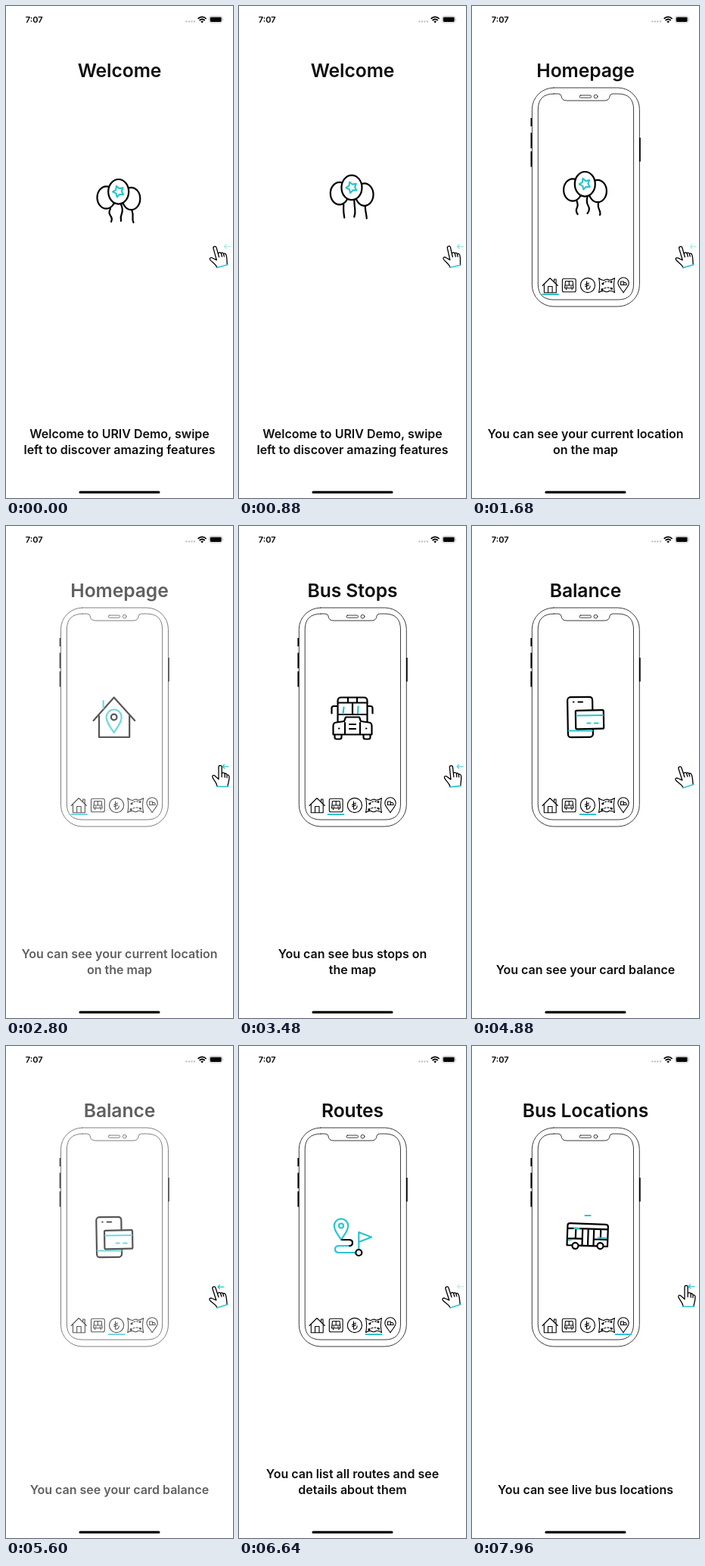
An HTML page that plays this animation: 300x650 px, repeating every 8000 ms.

```html
<!DOCTYPE html>
<html lang="en">
<head>
<meta charset="utf-8">
<title>Onboarding</title>
<style>
  html, body { margin: 0; width: 100%; height: 100%; overflow: hidden; background: #fff; }
  svg { display: block; width: 300px; height: 650px; }
  text { font-family: Inter, "Open Sans", sans-serif; font-weight: 600; fill: #0e0e10; text-anchor: middle; }
  #title { font-size: 24.7px; letter-spacing: -.1px; }
  .caption { font-size: 16px; }
  .clock { font-size: 11px; fill: #000; text-anchor: start; }
  .line { fill: none; stroke: #000; stroke-linecap: round; stroke-linejoin: round; }
  .icon { stroke-width: 2.2; }
  .tab { stroke-width: 1.1; }
  .frame { stroke: #3c3c3c; stroke-width: 1; }
  .cyan { stroke: #2bc4d0; }
  .paper { fill: #fff; }
</style>
</head>
<body>
<svg viewBox="0 0 300 650">
  <g id="status">
    <text class="clock" x="25.7" y="22">7:07</text>
    <g fill="#c4c4c6">
      <circle cx="238.5" cy="20.5" r="1.2"/><circle cx="242" cy="20.5" r="1.2"/>
      <circle cx="245.5" cy="20.5" r="1.2"/><circle cx="249" cy="20.5" r="1.2"/>
    </g>
    <g class="line" stroke-width="1.7" style="stroke-linecap:butt">
      <path d="M253.7 16.8Q259.2 12 264.7 16.8M255.6 19Q259.2 16 262.8 19"/>
    </g>
    <path d="M257.3 20.4Q259.2 18.9 261.1 20.4L259.2 22.4Z"/>
    <rect x="268.7" y="13.6" width="17" height="8.4" rx="2.4" fill="none" stroke="#aaa" stroke-width=".7"/>
    <rect x="269.8" y="14.7" width="14.8" height="6.2" rx="1.4"/>
    <path d="M286.6 16.5q1.5 1.4 0 2.8z" fill="#999"/>
  </g>

  <g id="words">
    <text id="title" x="150" y="94"></text>
    <text class="caption" x="150" y="571"></text>
    <text class="caption" x="150" y="592"></text>
  </g>

  <g id="scene">
    <g id="phone" class="line">
      <g class="frame">
        <rect x="79.3" y="108" width="142" height="289" rx="28.5"/>
        <path d="M108 116H114Q117.5 116 118 119Q118.500 125 125 125H175Q181.500 125 182 119Q182.500 116 186 116H193Q213.500 116 213.500 137V367Q213.500 388 193 388H108Q87.200 388 87.200 367V137Q87.200 116 108 116Z"/>
        <rect x="142" y="118" width="15.500" height="3.200" rx="1.600"/>
        <circle cx="163.500" cy="119.600" r="2.400"/>
      </g>
      <path stroke-width="1.800" style="stroke-linecap:butt" d="M78.300 148V159M78.300 167.500V188M78.300 192V212.500M221.800 174V205.500"/>
      <g class="tab">
        <path d="M93 369.500L103 359.500L113.300 369.500M95.300 367.500V378.700H111.200V367.500M100.500 378.700V370.500H106V378.700M108.500 361V364.500M108.500 361H111V367"/>
        <rect x="119.300" y="360.200" width="17.800" height="17.600" rx="2"/>
        <path d="M123.500 363.500H133L134 372.800H122.500ZM123 369H133.500M128.200 364V369M124.500 373V374.800M132 373V374.800M124.800 371H126M130.500 371H131.700"/>
        <circle cx="152.900" cy="369" r="9.600"/>
        <path d="M151.500 363.800V374.300Q155.800 374.300 156.200 370M149.500 368.300L154.500 366M149.500 370.800L154.500 368.500"/>
        <path d="M167.500 359.500Q171 362.800 174.500 362.500Q178 359.800 181.500 362.300Q185 361.800 188.500 359.500Q186.300 369 188.500 378.500Q185 376 181.500 376.300Q178 379 174.500 376.500Q171 376 167.500 378.500Q169.700 369 167.500 359.500Z"/>
        <path stroke-dasharray="2 2" d="M172.500 367Q177 362 184 365M171.500 375Q178 370 185 373.500"/>
        <path stroke-width="2.400" d="M171.500 374.500h.6M172.500 367h.6M183.700 364.500h.6M184.200 373.500h.6"/>
        <path d="M200 378.700C196.500 373 192.800 370 192.800 366A7.200 7.200 0 0 1 207.200 366C207.200 370 203.500 373 200 378.700ZM196.500 364H200.500V368.500H196.500ZM200.500 365.500H203L204 367V368.500H200.500"/>
        <path id="underline" class="cyan" stroke-width="1.800" d="M0 381H21"/>
      </g>
    </g>

    <g id="icons" class="line icon">
      <g>
        <ellipse cx="132.500" cy="253" rx="12" ry="14.700"/>
        <ellipse cx="165.500" cy="254.500" rx="11.800" ry="14.700"/>
        <ellipse class="paper" cx="148.700" cy="245.300" rx="13.500" ry="16.300"/>
        <path id="star" class="cyan"/>
        <path id="strings"/>
      </g>
      <g>
        <path d="M122.500 257L149.500 226.500L177 257M129.800 251V279H170V251"/>
        <path class="cyan" d="M135.500 231V241M149.500 273C144 264.500 139.500 259 139.500 252.500A10 10 0 0 1 159.500 252.500C159.500 259 155 264.500 149.500 273Z"/>
        <circle cx="149.500" cy="252.500" r="3.800"/>
      </g>
      <g>
        <path d="M130.500 258V231Q130.500 226.500 135 226.500H165Q169.500 226.500 169.500 231V258M130.500 233.500H169.500M130.500 249H169.500M144 226.500V233.500M156 226.500V233.500M150 233.500V249M130.500 238H125Q122.500 238 122.500 241V247.500M169.500 238H174Q176.500 238 176.500 241V247.500"/>
        <path d="M140 275.500H124.500V264Q124.500 260 128.500 259.500L139 258L141 252.500H159L161 258L171.500 259.500Q175.500 260 175.500 264V275.500H160M140 260V275.500H160V260M146 262H154M146 268H154M126.500 275.500V279Q126.500 281.500 129 281.500H133Q135.500 281.500 135.500 279V275.500M164.500 275.500V279Q164.500 281.500 167 281.500H171Q173.500 281.500 173.500 279V275.500M132 267.500h.4M168 267.500h.4"/>
        <path class="cyan" d="M138.500 239.500L137.500 248M157.500 238.500L157 247.500"/>
      </g>
      <g>
        <rect x="126.500" y="226" width="33" height="53" rx="4" transform="rotate(-1 143 252)"/>
        <path d="M134 232.500h.5M140.500 232.500H146"/>
        <path class="cyan" d="M128 270.500H159"/>
        <rect class="paper" x="137" y="243.500" width="37" height="24.500" rx="1.500" transform="rotate(-1 155 255)"/>
        <path class="cyan" d="M138 250.500L173 250M152.500 260.500H156.500M162 260.500H166.500"/>
      </g>
      <g>
        <path class="cyan" d="M135 256C130 248 125.800 244 125.800 237.500A9.200 9.200 0 0 1 144.200 237.500C144.200 244 140 248 135 256ZM146 264H132Q127 264 127 268.500Q127 273 132 273H153.500M158.300 268.500V246L175 252.500L158.300 259"/>
        <circle class="cyan" cx="135" cy="237.500" r="3"/>
        <path d="M136 256H145.500Q150 256 150 260Q150 264 146 264"/>
        <circle cx="158.300" cy="273" r="4"/>
      </g>
      <g>
        <path class="cyan" d="M149.500 224H156.500"/>
        <g transform="rotate(2 153 249)">
          <path d="M132.500 264H126V238Q126 235 129 235H176Q179.500 235 179.500 238V264H174.500M141.500 264H165.500M126 241.500H179.500M126 255H145M161 255H179.500M137 241.500V255M146 241.500V264M153.500 241.500V264M161 241.500V264M170 241.500V255"/>
          <path class="cyan" d="M135 241.500H141M167 253H177M128 257H131"/>
          <circle class="paper" cx="137" cy="264.500" r="4"/><circle class="paper" cx="170" cy="263.500" r="4"/>
        </g>
      </g>
    </g>
  </g>

  <g id="hand" class="line" stroke-width="1.300">
    <path class="paper" d="M279 343.500C278 338 274 335.500 272.800 331.500C272.300 329.300 275 328.600 276.500 330.500L281 334.500V318.800C281 315.600 285.200 315.600 285.200 318.800V327.500C286 325 289.200 325.500 289.200 328C290 326.300 292 327 292 329.300C293.500 328.300 295 329.200 295 331.500C295.200 336 293.800 339 293 343.500M285.200 327V331.500M289.200 328V332M292 329.300V332.500"/>
    <path class="cyan" d="M278.500 344.300H293.500" stroke-width="1.600"/>
  </g>
  <path id="arrow" class="line cyan" stroke-width="1.300" d="M294 317.800H286M288.500 315.300L286 317.800L288.500 320.300"/>

  <rect x="96.500" y="640.800" width="107" height="3.200" rx="1.600"/>
</svg>

<script>
const LOOP = 8000, SLIDE = 320, SWING = 845, TAU = 2 * Math.PI;
const pages = [
  { start: -LOOP, title: "Welcome", lines: ["Welcome to URIV Demo, swipe", "left to discover amazing features"] },
  { start: 1370, title: "Homepage", lines: ["You can see your current location", "on the map"], tab: 93 },
  { start: 2717, title: "Bus Stops", lines: ["You can see bus stops on", "the map"], tab: 117.5 },
  { start: 4247, title: "Balance", lines: ["", "You can see your card balance"], tab: 142.5 },
  { start: 5517, title: "Routes", lines: ["You can list all routes and see", "details about them"], tab: 167.5 },
  { start: 6900, title: "Bus Locations", lines: ["", "You can see live bus locations"], tab: 189.5 }
];

const $ = id => document.getElementById(id);
const [title, words, scene, phone, underline, hand, arrow, strings] =
  ["title", "words", "scene", "phone", "underline", "hand", "arrow", "strings"].map($);
const captions = document.querySelectorAll(".caption");
const icons = [...$("icons").children];
const clamp = x => Math.min(1, Math.max(0, x));
const smooth = x => (x = clamp(x), x * x * (3 - 2 * x));
const ramp = (t, from, to) => smooth((t - from) / (to - from));

const starPoint = i => {
  const angle = i * Math.PI / 5 - 1.95, radius = i % 2 ? 4.1 : 7.6;
  return `${148.700 + radius * Math.cos(angle)} ${245 + radius * Math.sin(angle)}`;
};
$("star").setAttribute("d", `M${Array.from({ length: 10 }, (_, i) => starPoint(i)).join("L")}Z`);

function drawPage(t) {
  const current = pages.findLastIndex(page => t >= page.start);
  const progress = smooth((t - pages[current].start) / SLIDE);
  const leaving = progress < 0.5;
  const shown = leaving ? current - 1 : current;
  const page = pages[shown];
  const alpha = Math.abs(1 - 2 * progress);
  const shift = leaving ? -40 * progress : 40 * (1 - progress);

  title.textContent = page.title;
  captions.forEach((line, i) => line.textContent = page.lines[i]);
  words.setAttribute("opacity", alpha);
  scene.setAttribute("opacity", alpha);
  scene.setAttribute("transform", `translate(${shift} 0)`);
  phone.style.display = shown ? "" : "none";
  if (shown) underline.setAttribute("transform", `translate(${page.tab} 0)`);

  // The picture inside the phone follows once the page has settled.
  const settled = progress < 1 ? current - 1 : current;
  icons.forEach((icon, i) => icon.style.display = i === settled ? "" : "none");
}

function drawIcons(t) {
  const lift = (1 - Math.cos(TAU * t / 3360)) / 2;
  icons[0].setAttribute("transform", `translate(${lift * 0.5} ${-10 * lift})`);
  const bend = 3 - 5 * lift;
  strings.setAttribute("d",
    `M138 268q${-bend} 5 0 9t1 8M152 262q${bend} 7 1 12t-1 10M166.500 270q${bend / 2} 5 1 9t1 7`);
  icons[5].setAttribute("transform", `translate(${4 * Math.cos(TAU * (t - 7960) / 800) - 4} 0)`);
}

function drawHand(t) {
  const rise = -60;
  const phase = (t - rise) % SWING + rise;
  const lean = 1 - ramp(phase, rise, 200) + ramp(phase, 370, 520);
  hand.setAttribute("transform", `rotate(${-18 * lean} 284 345)`);

  const swiped = phase >= 370 && phase < 640;
  const sweep = swiped ? ramp(phase, 370, 520) : 0;
  const entering = phase < 370 ? 1 - ramp(phase, 60, 220) : +!swiped;
  const glow = swiped ? 1 - ramp(phase, 550, 640)
    : phase < 370 ? 0.3 + 0.7 * ramp(phase, rise, 200)
    : 0.3 * ramp(phase, 640, 720);
  arrow.setAttribute("opacity", glow);
  arrow.setAttribute("transform", `translate(${2.5 * entering - 6 * sweep} ${0.5 * sweep})`);
}

const began = performance.now();
function draw() {
  const t = Math.max(0, performance.now() - began) % LOOP;
  drawPage(t);
  drawIcons(t);
  drawHand(t);
  requestAnimationFrame(draw);
}
draw();
</script>
</body>
</html>
```
